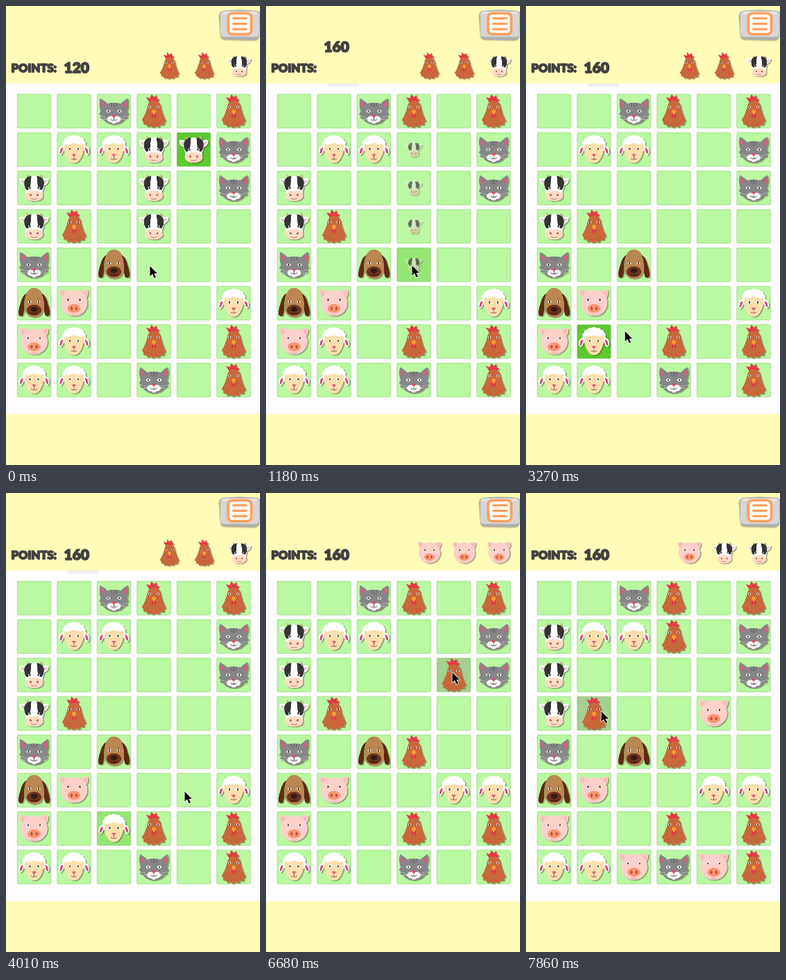
These frames come from a looping animation (366 px wide and 659 px high, 8 s). An HTML page with a canvas:

```html
<!DOCTYPE html>
<html lang="en">
<head>
<meta charset="utf-8">
<title>Farm board</title>
<style>
html, body { margin: 0; width: 100%; height: 100%; overflow: hidden; background: #fffcb8; }
canvas { display: block; width: 366px; height: 659px; }
</style>
</head>
<body>
<canvas id="stage"></canvas>
<script>
const W = 366, H = 659, LOOP = 8000, STEP = 148.35;
const dpr = window.devicePixelRatio || 1;
const stage = document.getElementById('stage');
stage.width = W * dpr;
stage.height = H * dpr;
const ctx = stage.getContext('2d');
let g = ctx;

// ---- drawing helpers
const clamp = v => Math.max(0, Math.min(1, v));
const easeOut = v => 1 - Math.pow(1 - clamp(v), 3);
function oval(x, y, rx, ry, color, rot = 0) {
  g.fillStyle = color;
  g.beginPath();
  g.ellipse(x, y, rx, ry, rot, 0, Math.PI * 2);
  g.fill();
}
function shape(d, color) {
  g.fillStyle = color;
  g.fill(new Path2D(d));
}
function line(d, color, width) {
  g.strokeStyle = color;
  g.lineWidth = width;
  g.lineCap = g.lineJoin = 'round';
  g.stroke(new Path2D(d));
}
function box(x, y, w, h, r, fill, stroke, width = 1) {
  g.beginPath();
  g.roundRect(x, y, w, h, r);
  if (fill) { g.fillStyle = fill; g.fill(); }
  if (stroke) { g.strokeStyle = stroke; g.lineWidth = width; g.stroke(); }
}
function mirror(draw) {
  for (const s of [-1, 1]) {
    g.save();
    g.scale(s, 1);
    draw();
    g.restore();
  }
}
function eyes(dx, y, rx = 2.5, ry = 1.7) {
  for (const s of [-1, 1]) {
    oval(s * dx, y, rx, ry, '#fff');
    oval(s * dx, y, 1.2, 1.4, '#42352f');
  }
}

// ---- animals, centred on 0,0
const art = {
  S() {
    mirror(() => {
      shape('M13 -5 Q21 -6 22 1 Q22.5 7 19 8 Q15 5 13 -5Z', '#fff');
      shape('M16 -3 Q21 -2 20.5 6 Q16.5 6 16 -3Z', '#d9527c');
    });
    oval(0, -4, 15.5, 14, '#fff');
    for (let i = 0; i < 9; i++) {
      const a = Math.PI * (1.12 * i / 8 - 1.06);
      oval(Math.cos(a) * 12.5, -7 + Math.sin(a) * 9.5, 4.6, 4.4, '#fff');
    }
    shape('M-14 -4 Q-13 -13 0 -13 Q13 -13 14 -4 Q14 5 10 12 Q6 19.5 0 19.5 Q-6 19.5 -10 12 Q-14 5 -14 -4Z', '#fddfad');
    for (let i = -2; i < 3; i++) oval(i * 4.6, -12.5 + Math.abs(i), 3.6, 3.6, '#fff');
    eyes(6, -1);
    shape('M-3.5 7 Q0 5.5 3.5 7 L0 10.5Z', '#e36479');
    line('M0 10.5 V13 M-4 13 Q-1 15.5 0 13 Q1 15.5 4 13', '#8b5847', .9);
  },
  W() {
    mirror(() => {
      shape('M9 -9 Q15 -16 21 -13 Q21 -5 13 -3Z', '#fff');
      shape('M13 -9 Q17 -12.5 19.5 -11 Q18 -6 13 -5Z', '#e0cfc8');
      shape('M6 -15 Q9 -16 10 -20 Q12 -15 10 -13Z', '#d4b17e');
    });
    shape('M-11 -15 Q0 -20 11 -15 Q17 -5 12 5 Q14 18 0 19 Q-14 18 -12 5 Q-17 -5 -11 -15Z', '#fff');
    shape('M-4 -17 Q-11 -17 -14 -10 Q-15 -2 -11 3 Q-6 3 -5 -5Z', '#343434');
    shape('M4 -17 Q11 -17 14 -10 Q15 -2 11 3 Q6 3 5 -5Z', '#343434');
    eyes(6, 0, 2.4, 1.7);
    oval(0, 11.5, 13, 7.5, '#ffdac3');
    mirror(() => oval(5, 10, 1.4, 1.8, '#ad6e61', .3));
    line('M-4 15 Q0 17 4 15', '#b9796b', .9);
  },
  C() {
    shape('M-20 -18.5 Q-15 -16 -10 -11 Q0 -13 10 -11 Q15 -16 20 -18.5 Q22 -8 19 0 L21.5 5 L18.5 6 L20 10 L16 11 Q11 18.5 0 19 Q-11 18.5 -16 11 L-20 10 L-18.5 6 L-21.5 5 L-19 0 Q-22 -8 -20 -18.5Z', '#868688');
    mirror(() => {
      shape('M18.5 -15 Q20 -9 17.5 -4 Q16 -8 13 -10Z', '#d65f7d');
      line('M4 -11 L3 -7', '#68686b', 1.2);
    });
    line('M0 -11.5 V-6', '#68686b', 1.3);
    eyes(8, 0, 3, 1.9);
    mirror(() => oval(4.5, 11.5, 5.4, 4.5, '#f4f2f0'));
    oval(0, 15.5, 3.8, 2.6, '#f4f2f0');
    shape('M-3.5 6 Q0 4.5 3.5 6 L0 9.5Z', '#df4965');
    line('M0 9 V12 M-4 12 Q-1 14.5 0 12 Q1 14.5 4 12', '#555', .8);
    mirror(() => line('M10 9.5 L19 7 M10 11.5 L19 12', '#d0d0d0', .5));
  },
  H() {
    shape('M-6 -12 L-11 -20 L-5 -18.5 L-4 -24.5 L0 -20 L4 -23 L4 -18 L8 -17 L4 -12Z', '#e63b43');
    shape('M-9 -8 Q-7 -15 0 -15 Q8 -15 10 -7 Q12 4 17.5 14 L15 16 L15 20 L10 19.5 L7 23.5 L3 21.5 L-1 24 L-5 21.5 L-9 23 L-11 19 L-15 19 L-15 15 L-17.5 13 Q-11 3 -9 -8Z', '#c9683a');
    mirror(() => line('M7 15 Q9 16.5 11 15 M2.5 18.5 Q4 20 6 18.5', '#b75a32', .9));
    eyes(6, -6, 2.4, 1.7);
    oval(-1.8, 6.5, 1.5, 3.6, '#dd3944', .2);
    oval(1.8, 6.5, 1.5, 3.6, '#dd3944', -.2);
    shape('M-3.5 0 Q0 -5 3.5 0 L0 6Z', '#f99a32');
  },
  P() {
    mirror(() => {
      shape('M7 -16 Q14 -21 20 -19 Q22 -12 16 -6Z', '#fbcac5');
      shape('M13 -15 Q17 -18 18.5 -17 Q19 -13 16.5 -10Z', '#f6b9b4');
    });
    oval(0, 0, 19.3, 18.5, '#fdd0ca');
    eyes(8.5, -5, 2.3, 1.7);
    oval(0, 7.5, 9.3, 6.3, '#fa9671');
    mirror(() => oval(3.6, 7.5, 1.6, 2.4, '#b9513f'));
    line('M-4 16 Q0 17 4 16', '#e59c96', .9);
  },
  D() {
    shape('M-11 -14 Q-7 -22 0 -22 Q7 -22 11 -14 Q15 -2 13.5 9 Q11 20 0 20 Q-11 20 -13.5 9 Q-15 -2 -11 -14Z', '#ba8750');
    mirror(() => {
      shape('M11 -14 Q17 -11 19.5 0 Q23.5 11 22 17 Q18.5 21 15.5 16 Q14 9 14.5 1 Q14 -7 11 -14Z', '#5d2915');
      line('M5 -5.5 Q7 -6.5 9 -5.5', '#94663a', .8);
    });
    eyes(6.5, -2, 2.5, 1.6);
    oval(0, 10, 10.5, 7.8, '#6c341b');
    oval(0, 8.5, 4.6, 3.4, '#301a13');
    line('M0 12 V14 M-5 14 Q0 16.5 5 14', '#3b1c10', .9);
  }
};

function makeSprite(draw) {
  const c = document.createElement('canvas');
  c.width = c.height = 168;
  g = c.getContext('2d');
  g.scale(3, 3);
  g.translate(28, 28);
  draw();
  g = ctx;
  return c;
}
const sprites = {};
for (const id in art) sprites[id] = makeSprite(art[id]);

function animal(id, x, y, s = 1, alpha = 1) {
  if (s <= 0.01 || alpha <= 0) return;
  g.save();
  g.globalAlpha = alpha;
  g.shadowColor = 'rgba(70,60,40,.45)';
  g.shadowOffsetX = 1.6 * dpr;
  g.shadowOffsetY = 1.2 * dpr;
  g.shadowBlur = 1.5 * dpr;
  g.drawImage(sprites[id], x - 28 * s, y - 28 * s, 56 * s, 56 * s);
  g.restore();
}

// ---- board and story; times are counted in steps
const start = [
  '..CH.H', '.SSW.C', 'W..W.C', 'WH.W..',
  'C.D...', 'DP...S', 'P..H.H', 'SS.C.H'
];
const moves = [
  { id: 'W', at: 2, from: [1, 4], path: [[2, 4], [3, 4], [4, 4], [4, 3]] },
  { id: 'S', at: 27, from: [6, 1], path: [[6, 2], [5, 2], [5, 3], [5, 4]] },
  { id: 'H', at: 48, from: [2, 4], path: [[1, 4], [1, 3]], born: 30 }
];
const drops = [
  { at: 30, list: [['W', 1, 0], ['H', 2, 4], ['H', 4, 3]] },
  { at: 49, list: [['P', 3, 4], ['P', 7, 2], ['P', 7, 4]] }
];
const queues = [
  { ids: 'HHW', from: -99, to: 30 },
  { ids: 'PPP', from: 30, to: 49 },
  { ids: 'PWW', from: 49, to: 99 }
];
const GREEN = [92, 201, 48], GREY = [164, 208, 144], LIGHT = [187, 248, 162];
const picks = [
  [1, 4, 0, 2, GREEN], [6, 1, 20, 21, GREY], [6, 1, 21, 27, GREEN],
  [2, 4, 45, 46, GREY], [2, 4, 46, 48, GREEN], [3, 1, 53, 54, GREY]
];
const pointer = [
  [0, 207, 373], [4, 210, 372], [9, 210, 372], [14, 110, 436], [17, 110, 436],
  [19, 100, 480], [21, 102, 480], [24, 257, 428], [33, 257, 428], [41, 277, 249],
  [43, 268, 257], [45, 268, 257], [47, 214, 205], [49, 214, 205], [52, 106, 313], [53, 108, 313]
];
const CLEAR = 5, CELL = 49.5;
const cellX = c => 15.75 + c * 57.5;
const cellY = r => 126.2 + r * 55.15;
const since = (k, at) => (k - at) * STEP;
const mix = (a, b, t) => `rgb(${a.map((v, i) => Math.round(v + (b[i] - v) * t))})`;

function trail(dt) {
  if (dt < 0) return 0;
  const rise = clamp((dt + 120) / 268);
  const fall = dt < 300 ? .9 - .1 * clamp((dt - 150) / 150) : .8 * clamp((600 - dt) / 300);
  return rise * fall;
}

function cellColor(r, c, k) {
  for (const [pr, pc, a, b, color] of picks)
    if (pr === r && pc === c && k >= a && k < b) return mix(color, color, 0);
  let t = 0;
  for (const m of moves)
    m.path.forEach(([pr, pc], i) => {
      if (pr === r && pc === c) t = Math.max(t, trail(since(k, m.at + i)));
    });
  return mix(LIGHT, GREEN, t);
}

function drawBoard(k) {
  const put = (id, r, c, s, a) => animal(id, cellX(c) + CELL / 2, cellY(r) + CELL / 2, s, a);
  for (let r = 0; r < 8; r++)
    for (let c = 0; c < 6; c++)
      box(cellX(c) + .5, cellY(r) + .5, CELL - 1, CELL - 1, 1.5, cellColor(r, c, k), 'rgba(100,180,65,.4)');

  const gone = clamp((since(k, CLEAR) - 250) / 450);
  start.forEach((row, r) => [...row].forEach((id, c) => {
    if (id === '.') return;
    const fade = id === 'W' && c === 3 ? gone : 0;
    put(id, r, c, 1 - fade, 1 - fade);
  }));
  for (const m of moves) {
    const i = Math.min(k - m.at, m.path.length - 1);
    const [r, c] = i < 0 ? m.from : m.path[i];
    const fade = m.id === 'W' ? gone : 0;
    if (!m.born || k >= m.at) put(m.id, r, c, 1 - fade, 1 - fade);
  }
  for (const d of drops)
    for (const [id, r, c] of d.list) {
      const left = d.at === 30 && r === 2 && k >= 48;
      if (!left) put(id, r, c, easeOut((since(k, d.at) - 300) / 300));
    }
}

function drawQueue(k) {
  for (const q of queues) {
    if (since(k, q.to) >= 290) continue;
    const s = .8 * easeOut((since(k, q.from) - 450) / 140);
    [...q.ids].forEach((id, i) => animal(id, 235.5 + i * 50.2, 86, s));
  }
}

function hop(p) {
  const keys = [[0, 0], [.2, 0], [.4, -30], [.43, -30], [.53, 0], [.7, -15], [.8, 0], [.9, -4], [1, 0]];
  if (p <= 0 || p >= 1) return 0;
  const i = keys.findIndex(q => q[0] > p);
  const [a, ya] = keys[i - 1], [b, yb] = keys[i];
  const u = (p - a) / (b - a);
  return ya + (yb - ya) * (yb < ya ? 1 - (1 - u) ** 2 : u * u);
}

function label(text, x, y, size) {
  g.font = `900 ${size}px Lato, "Open Sans", sans-serif`;
  g.fillStyle = g.strokeStyle = '#424242';
  g.lineWidth = 1.6;
  g.lineJoin = 'round';
  g.fillText(text, x, y);
  g.strokeText(text, x, y);
}

function drawMenu() {
  const stone = 'M313 7 Q336 4 362 7 Q367 8 367 14 L365 43 Q364 49 357 49 L316 48 Q310 48 309 42 L307 14 Q307 8 313 7Z';
  g.save();
  g.shadowColor = 'rgba(0,0,0,.3)';
  g.shadowBlur = 2 * dpr;
  g.shadowOffsetY = dpr;
  shape(stone, '#b0afac');
  g.restore();
  box(309, 7.5, 56, 37, 5, '#d6d5d3');
  line('M312 10 Q336 7.5 361 10', '#efefed', 1.6);
  box(320, 10.5, 33.5, 30, 6, '#fff7ed', '#ff9e5c', 3.5);
  for (let i = 0; i < 3; i++) line(`M327.5 ${17.8 + i * 7.7} H346.5`, '#ff9e5c', 3);
}

function drawPointer(k) {
  let i = pointer.findIndex(p => p[0] > k);
  if (i < 0) i = pointer.length - 1;
  const [a, x0, y0] = pointer[i - 1], [b, x1, y1] = pointer[i];
  let u = clamp((k - a) / (b - a));
  u = u * u * (3 - 2 * u);
  g.save();
  g.translate(x0 + (x1 - x0) * u, y0 + (y1 - y0) * u);
  const arrow = 'M.5 .5 V15 L4 11.8 L6.5 17.6 L9 16.5 L6.5 11 H11Z';
  line(arrow, '#fff', 1.6);
  shape(arrow, '#000');
  g.restore();
}

function draw(t) {
  const k = Math.min(53, Math.floor((t + 14) / STEP));
  g.setTransform(dpr, 0, 0, dpr, 0, 0);
  g.fillStyle = '#fffcb8';
  g.fillRect(0, 0, W, H);
  g.fillStyle = '#fdfdfd';
  g.fillRect(0, 111, W, 475);
  if (k >= 6 && k < 31) {
    g.fillStyle = '#efefef';
    g.fillRect(89, 111, 45, 5);
  }
  drawMenu();
  label('POINTS:', 7.5, 94.5, 16.5);
  label(k < CLEAR ? '120' : '160', 83.5, 95.5 + hop(since(k, CLEAR) / 1000), 21);
  drawQueue(k);
  drawBoard(k);
  drawPointer(k);
}

const t0 = performance.now();
function tick() {
  draw((performance.now() - t0) % LOOP);
  requestAnimationFrame(tick);
}
draw(0);
requestAnimationFrame(tick);
</script>
</body>
</html>
```
